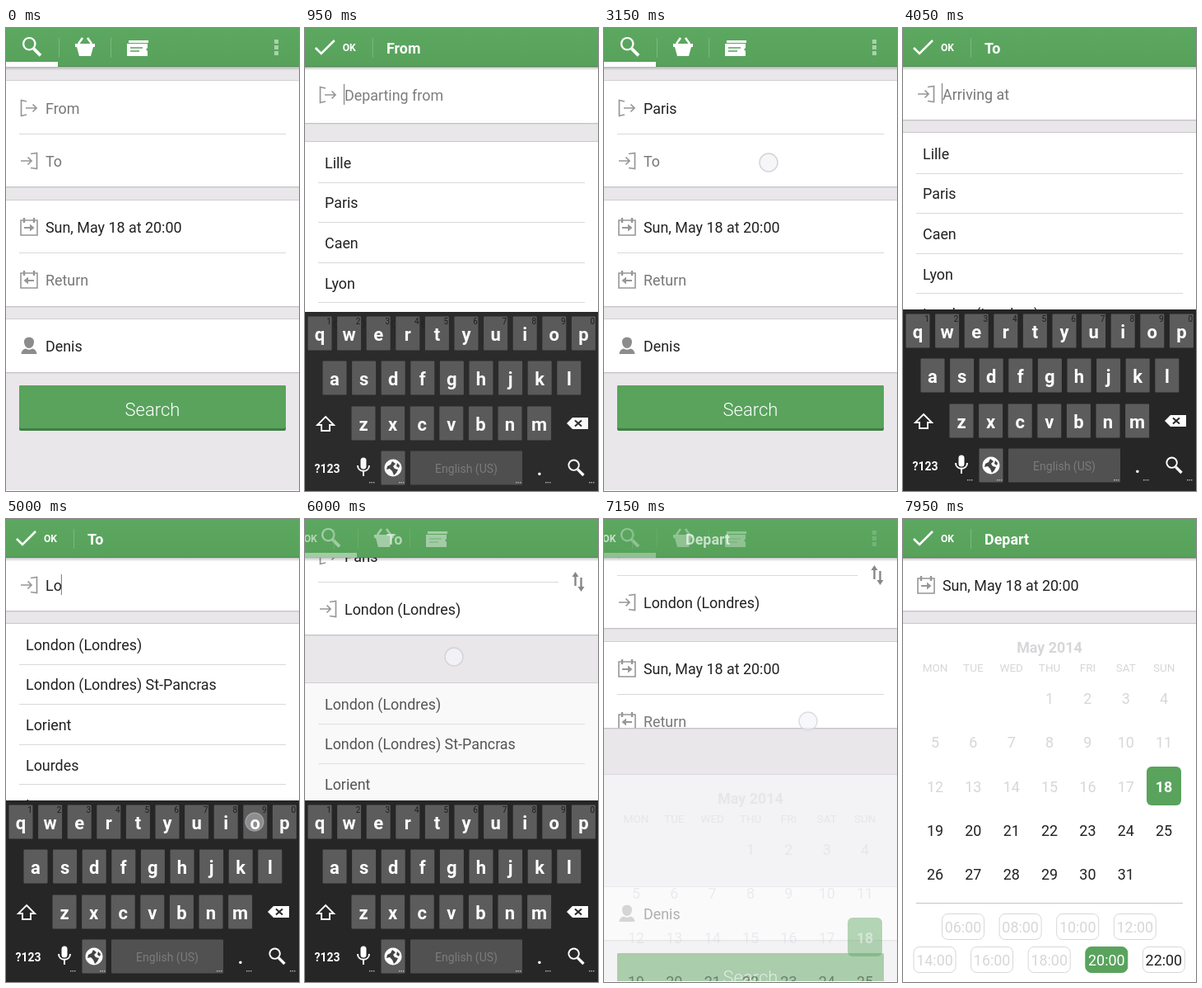
Animation of 356x561 px, one loop 8000 ms. Source, as an HTML page with a canvas:

```html
<!DOCTYPE html>
<html lang="en">
<head>
<meta charset="utf-8">
<title>Trip search</title>
<style>
html, body { margin: 0; width: 100%; height: 100%; overflow: hidden; background: #e9e7ea; }
canvas { display: block; width: 356px; height: 561px; }
</style>
</head>
<body>
<canvas id="stage"></canvas>
<script>
const W = 356, H = 561, LOOP = 8000, MOVE = 500;
const GREEN = '#59a35d', INK = '#222', HINT = '#777', ICON = '#979797', PALE = '#d7d7da', GAP = '#e9e7ea';
const canvas = document.getElementById('stage'), ctx = canvas.getContext('2d');
const ratio = window.devicePixelRatio || 1;
canvas.width = W * ratio;
canvas.height = H * ratio;

const clamp = v => Math.min(1, Math.max(0, v));
const ease = v => (1 - Math.cos(Math.PI * clamp(v))) / 2;
const mix = (a, b, p) => a + (b - a) * p;

// Edit screens: timing, the row being edited, its card and the panel's travel.
const screens = [
  { title: 'From', hint: 'Departing from', row: 97, card: 0, open: 520, close: 1948, travel: 240, keys: true },
  { title: 'To', hint: 'Arriving at', row: 161, card: 0, open: 3300, close: 5795, travel: 197, keys: true },
  { title: 'Depart', row: 241, card: 1, open: 6943, close: Infinity, travel: 291 }
];
const cards = [[64, 192], [209, 337], [353, 417]];
const EDIT_BOTTOM = 111;
const TYPE_L = 4500, TYPE_O = 4950;
const cities = ['Lille', 'Paris', 'Caen', 'Lyon', 'London (Londres)'];
const citiesL = ['Lille', 'Lyon', 'London (Londres)', 'London (Londres) St-Pancras', 'Lorient'];
const citiesLo = ['London (Londres)', 'London (Londres) St-Pancras', 'Lorient', 'Lourdes', 'Longwy'];
const taps = [ // start, end, x, y
  [200, 760, 180, 100], [1650, 2150, 180, 205], [2950, 3520, 200, 163], [4350, 4600, 320, 421],
  [4800, 5050, 302, 367], [5500, 6120, 181, 167], [6650, 7240, 248, 245]
];

function text(str, x, y, color = INK, size = 17.9, weight = 400, align = 'left') {
  ctx.font = `${weight} ${size}px Roboto, sans-serif`;
  ctx.textAlign = align;
  ctx.fillStyle = color;
  ctx.fillText(str, x, Math.round(y + size * 0.355 + 0.4));
}
function rect(x, y, w, h, color) {
  ctx.fillStyle = color;
  ctx.fillRect(x, y, w, h);
}
function round(x, y, w, h, r, fill, stroke) {
  ctx.beginPath();
  ctx.roundRect(x, y, w, h, r);
  if (fill) { ctx.fillStyle = fill; ctx.fill(); }
  if (stroke) { ctx.strokeStyle = stroke; ctx.lineWidth = 1; ctx.stroke(); }
}
function path(d, x, y, color, width) {
  const shape = new Path2D(d);
  ctx.save();
  ctx.translate(x, y);
  ctx.fillStyle = ctx.strokeStyle = color;
  ctx.lineWidth = width || 1;
  if (width) ctx.stroke(shape); else ctx.fill(shape);
  ctx.restore();
}
function layer(alpha, dy, draw) {
  if (alpha <= 0) return;
  ctx.save();
  ctx.globalAlpha *= alpha;
  ctx.translate(0, Math.round(dy));
  draw();
  ctx.restore();
}

function magnifier(x, y, s, color) {
  path(`M${-s * .25} ${-s} a${s * .65} ${s * .65} 0 1 1 -.01 0z`, x, y, color, s * .2);
  path(`M${s * .25} ${s * .2} L${s} ${s * .95}`, x, y, color, s * .36);
}
const ARROW = 'M-4 0H9 M4.5 -4.5L9 0L4.5 4.5';
const icons = {
  from: y => {
    path('M-2 -8L-8.5 -9.5V9.5L-2 8', 27, y, ICON, 1.7);
    path(ARROW, 28, y, ICON, 1.7);
  },
  to: y => {
    path('M2 -8.5L9.5 -9.5V9.5L2 8.5', 28, y, ICON, 1.7);
    path(ARROW, 22, y, ICON, 1.7);
  },
  date: (y, dir = 1) => {
    path('M-10 -8H10V10H-10Z', 28, y, ICON, 1.6);
    path('M-6 -11V-5M6 -11V-5', 28, y, ICON, 2.4);
    path(dir > 0 ? 'M-6 0H1V-3.5L6.5 1L1 5.5V2H-6Z' : 'M6 0H-1V-3.5L-6.5 1L-1 5.5V2H6Z', 28, y, ICON);
  },
  person: y => path('M-6 -5C-6 -12 6 -12 6 -5C6 0 3 3 0 3S-6 0 -6 -5M-9.5 10C-9 5 -6 4 -4 3.5Q0 6 4 3.5C6 4 9 5 9.5 10Z', 28, y, '#8c8c8c'),
  swap: y => {
    path('M-3.5 5V-8M3.5 -5V8', 332, y, '#888', 2.4);
    path('M-7.5 -6L-3.5 -12L.5 -6ZM-.5 6L3.5 12L7.5 6Z', 332, y, '#888');
  }
};

function card(top, bottom, draw) {
  if (bottom < 47) return;
  rect(0, top - 1, W, 1, '#d0ced1');
  rect(0, bottom, W, 1, '#c5c3c7');
  rect(0, bottom + 1, W, 1, '#dcdadd');
  rect(0, top, W, bottom - top, '#fff');
  ctx.save();
  ctx.beginPath();
  ctx.rect(0, top, W, bottom - top);
  ctx.clip();
  draw();
  ctx.restore();
}

// Row dividers vanish as the row above or below them takes over the card.
const divider = (y, width, p) => layer(clamp((1 - p) * 3), 0, () => rect(16, y, width, 1, '#d9d9d9'));

// A row label which turns into an input hint as its screen opens.
function field(s, label, value, y, p) {
  if (value) return text(value, 48, y);
  layer(1 - p, 0, () => text(label, 48, y, HINT));
  layer(p, 0, () => text(s.hint, 48, y, HINT));
}

function tripRows(dy, t, s, p) {
  const from = t >= screens[0].close ? 'Paris' : '';
  const done = t >= screens[1].close;
  const to = done ? 'London (Londres)' : t >= TYPE_O ? 'Lo' : t >= TYPE_L ? 'L' : '';
  icons.from(97 + dy);
  field(screens[0], 'From', from, 97 + dy, s === screens[0] ? p : 0);
  divider(128 + dy, done ? 292 : 324, p);
  icons.to(161 + dy);
  field(screens[1], 'To', to, 161 + dy, s === screens[1] ? p : 0);
  if (done) icons.swap(128 + dy);
  const editing = s.keys && p > .6 && t < s.close;
  if (editing && (t + 250) % 1000 < 500) {
    ctx.font = '400 17.9px Roboto, sans-serif';
    const typed = s === screens[1] ? ctx.measureText(to).width : 0;
    rect(47 + typed, s.row + dy - 13, 1, 25, '#777');
  }
}
function dateRows(dy, t, s, p) {
  icons.date(241 + dy);
  text('Sun, May 18 at 20:00', 48, 241 + dy);
  divider(272 + dy, 324, p);
  icons.date(305 + dy, -1);
  text('Return', 48, 305.5 + dy, HINT);
}
function personRow(dy) {
  icons.person(385 + dy);
  text('Denis', 48, 385.5 + dy);
}

function form(t, s, p) {
  const scroll = Math.round(-p * (s.row - 80)), push = Math.round(252 * p);
  const rows = [tripRows, dateRows, personRow];
  cards.forEach(([top, bottom], i) => {
    const below = i > s.card, dy = below ? push : scroll;
    const end = i === s.card ? Math.round(mix(bottom, EDIT_BOTTOM, p)) : bottom + dy;
    layer(below ? 1 - p : 1, 0, () => card(top + dy, end, () => rows[i](dy, t, s, p)));
  });
  layer(1 - p, push, () => {
    round(16, 433, 324, 55, 2, '#3f7f45');
    round(16, 433, 324, 52, 2, GREEN);
    text('Search', 178, 461.5, '#fff', 22, 300, 'center');
  });
}

function cityList(t, s) {
  const list = s === screens[0] || t < TYPE_L ? cities : t < TYPE_O ? citiesL : citiesLo;
  list.forEach((name, i) => {
    text(name, 24, 152 + i * 48.6);
    rect(16, Math.round(175.5 + i * 48.6), 324, 1, '#d9d9d9');
  });
}

function calendar() {
  const column = i => 39 + i * 46.35;
  text('May 2014', 178, 155.5, PALE, 17.9, 700, 'center');
  ['MON', 'TUE', 'WED', 'THU', 'FRI', 'SAT', 'SUN'].forEach((day, i) =>
    text(day, column(i), 180, PALE, 13.5, 400, 'center'));
  round(296, 300, 42, 47, 6, GREEN);
  for (let day = 1; day <= 31; day++) {
    const cell = day + 2, today = day === 18;
    text(day, column(cell % 7), 217 + Math.floor(cell / 7) * 53.4,
      today ? '#fff' : day < 18 ? PALE : INK, 17.9, today ? 700 : 400, 'center');
  }
  rect(16, 465, 324, 1, '#c4c4c4');
  for (let i = 0; i < 9; i++) {
    const x = i < 4 ? 73 + i * 69.6 : 38.5 + (i - 4) * 69.6, y = i < 4 ? 494 : 534;
    const picked = i === 7;
    round(x - 25.5, y - 15.5, 51, 31, 7, picked ? GREEN : '#fff', picked ? GREEN : PALE);
    text(String(6 + i * 2).padStart(2, '0') + ':00', x, y + .5, picked ? '#fff' : i === 8 ? INK : PALE, 17.9, 400, 'center');
  }
}

function panel(t, s, p) {
  layer(clamp(p * 1.2), s.travel * (1 - p), () => {
    rect(0, 126, W, 1, '#c9c7cb');
    rect(0, 127, W, H, '#fff');
    s.keys ? cityList(t, s) : calendar();
  });
}

function header(t, s, p) {
  const closing = t >= s.close;
  const edit = closing ? clamp((p - .25) / .7) : clamp(p * 1.8);
  for (let i = 0; i < 4; i++) rect(0, 47 + i, W, 1, `rgba(0,0,0,${.2 - i * .05})`);
  const shade = ctx.createLinearGradient(0, 0, 0, 47);
  shade.addColorStop(0, '#5da861');
  shade.addColorStop(1, '#57a15b');
  rect(0, 0, W, 47, shade);
  rect(0, 46, W, 1, '#4b9050');
  layer(1 - edit, 0, () => {
    magnifier(31, 23, 11, '#fff');
    rect(0, 41, 63, 6, '#fff');
    rect(64, 12, 1, 24, '#7bb87e');
    rect(127, 12, 1, 24, '#7bb87e');
    path('M-12 -4H12V0H10L7 11H-7L-10 0H-12Z', 96, 23, '#fff');
    path('M-8 -4L-3 -11M8 -4L3 -11', 96, 23, '#fff', 2.5);
    path('M-11 -9H13V-6H-11ZM-13 -5H12V0L10 2L12 4V10H-13Z', 160, 24, '#fff');
    path('M-9 0H6M-9 4H2', 160, 24, GREEN, 1.5);
    if (!closing || p === 0) for (const y of [14, 21, 28]) rect(326, y, 5, 5, '#a9d1ab');
  });
  layer(edit, 0, () => {
    text(s.title, 99, 24, '#fff', 17.9, 700);
    ctx.translate(-(closing ? 130 * (1 - p) : 120 * (1 - p) ** 2), 0);
    path('M-11 1L-4 8L12 -8', 24, 23, '#fff', 2.6);
    text('OK', 46, 23.5, '#fff', 12.1, 700);
    rect(82, 12, 1, 24, '#7bb87e');
  });
}

function keyboard() {
  const key = (x, y, w = 29, color = '#5c5c5c') => round(x - w / 2, y - 20.5, w, 41, 1, color);
  const white = '#fff', base = '#262626';
  rect(0, 341, W, 340, base);
  ['qwertyuiop', 'asdfghjkl', 'zxcvbnm'].forEach((row, r) => {
    [...row].forEach((letter, i) => {
      const x = [18, 36, 71][r] + i * 35.6, y = [367, 421, 476][r];
      key(x, y);
      text(letter, x, y + .5, white, 22, 700, 'center');
      if (r === 0) text((i + 1) % 10, x + 11, 352, '#1d1d1d', 10, 400, 'center');
    });
  });
  path('M0 -9L10 1H5V8H-5V1H-10Z', 25, 477, white, 1.9);
  path('M-13 0L-6 -7H13V7H-6Z', 331, 476, white);
  path('M-3 -3.5L5 3.5M5 -3.5L-3 3.5', 331, 476, base, 2);
  text('?123', 27, 530.5, white, 14, 700, 'center');
  path('M-3.5 -7a3.5 3.5 0 0 1 7 0V0a3.5 3.5 0 0 1 -7 0Z', 71, 528, white);
  path('M-7 -1C-7 8 7 8 7 -1M0 6V12', 71, 528, white, 2);
  key(107, 530);
  path('M0 -10.5A10.5 10.5 0 1 1 -.01 -10.5Z', 107, 530, white);
  path('M-1 -8L3 -5L0 -2L2 1L6 2L4 6L1 9L-1 4L-4 1L-8 2L-7 -2L-3 -4ZM5 -6L8 -3L7 0L4 -2Z', 107, 530, '#444');
  key(196, 530, 136, '#515151');
  text('English (US)', 196, 530.5, '#7c7c7c', 14, 400, 'center');
  text('.', 285, 531, white, 22, 700, 'center');
  magnifier(329, 530, 9.5, white);
  for (const x of [78, 114, 256, 292, 345])
    for (let i = 0; i < 3; i++) rect(x + i * 2.5, 547, 1.4, 1.4, '#bbb');
}

function touches(t) {
  for (const [start, end, x, y] of taps) {
    const alpha = Math.min(clamp((t - start) / 100), clamp((end - t) / 120));
    layer(alpha, 0, () => {
      ctx.beginPath();
      ctx.arc(x, y, 11, 0, Math.PI * 2);
      ctx.fillStyle = 'rgba(244,244,248,.8)';
      ctx.fill();
      ctx.strokeStyle = '#d2d2d8';
      ctx.lineWidth = 1.4;
      ctx.stroke();
    });
  }
}

function draw(t) {
  ctx.setTransform(ratio, 0, 0, ratio, 0, 0);
  rect(0, 0, W, H, GAP);
  const s = [...screens].reverse().find(screen => t >= screen.open) || screens[0];
  const p = ease((t - s.open) / MOVE) - ease((t - s.close) / MOVE);
  form(t, s, p);
  panel(t, s, p);
  rect(0, 560, W, 1, '#fff');
  header(t, s, p);
  if (s.keys) {
    const shown = ease((t - s.open - 190) / 270) - ease((t - s.close - 450) / 250);
    layer(shown, (1 - shown) * 110, keyboard);
  }
  touches(t);
}

function tick() {
  draw(performance.now() % LOOP);
  requestAnimationFrame(tick);
}
tick();
</script>
</body>
</html>
```
